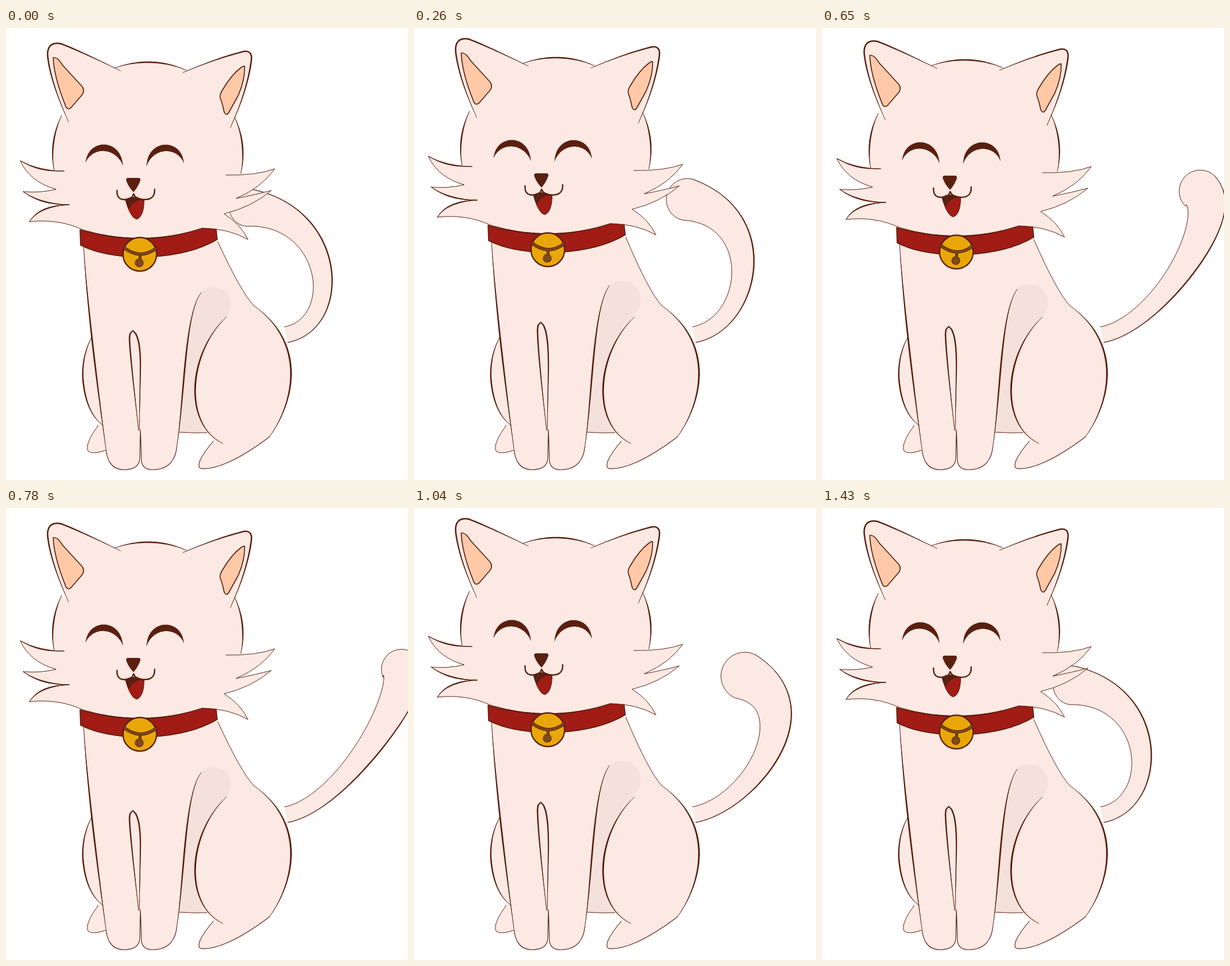
Write an HTML page that moves like this. It is 706 by 793 pixels and loops after 1560 ms.

```html
<!DOCTYPE html>
<html lang="en">
<head>
<meta charset="utf-8">
<title>Happy cat</title>
<style>
  html, body { margin: 0; width: 100%; height: 100%; overflow: hidden; background: #fff; }
  svg { display: block; width: 706px; height: 793px; }
  path, circle { stroke-linecap: round; stroke-linejoin: round; }
</style>
</head>
<body>
<svg viewBox="0 0 706 793">
  <g id="tail"></g>
  <g id="body"></g>
  <g id="head"></g>
</svg>
<script>
const STEP = 130, STEPS = 12;
const FUR = '#fce9e3', LINE = '#5a2010', RED = '#a01c15', GOLD = '#e9a707',
      BRONZE = '#804a1d', EAR = '#ffc9a8', SHADE = '#f4e1dc';

const fill = (d, color) => `<path d="${d}" fill="${color}"/>`;
const stroke = (d, w = 1, color = LINE) =>
  `<path d="${d}" fill="none" stroke="${color}" stroke-width="${w}"/>`;
const disc = (x, y, r, color, w) =>
  `<circle cx="${x}" cy="${y}" r="${r}" fill="${color}" stroke="${LINE}" stroke-width="${w}"/>`;
// Chains open paths into one closed outline
const glue = (...parts) => parts.join('').replace(/(?!^)M/g, 'L') + 'Z';
const line = points => 'M' + points.map(p => p.map(v => v.toFixed(2)).join(' ')).join('L');

// Both edges of a band that follows a path; radius depends on the way along it
const ruler = document.createElementNS('http://www.w3.org/2000/svg', 'path');
function band(d, radius, n = 48) {
  ruler.setAttribute('d', d);
  const length = ruler.getTotalLength(), at = t => ruler.getPointAtLength(t * length);
  const left = [], right = [];
  for (let i = 0; i <= n; i++) {
    const t = i / n, p = at(t), a = at(Math.max(0, t - .01)), b = at(Math.min(1, t + .01));
    const dx = b.x - a.x, dy = b.y - a.y, k = radius(t) / Math.hypot(dx, dy);
    left.push([p.x + dy * k, p.y - dx * k]);
    right.push([p.x - dy * k, p.y + dx * k]);
  }
  return { left, right };
}

// Pen line that swells towards its middle
function brush(d, w) {
  const { left, right } = band(d, t => w / 2 * Math.sin(Math.PI * t));
  return fill(line([...left, ...right.reverse()]) + 'Z', LINE) + stroke(d, .9);
}

// Key poses by amount of swing: bend of the spine, centre and radius of the tip
const poses = [
  { swing: 0,    bend: [579, 329], tip: [425, 315], r: [33] },
  { swing: .25,  bend: [623, 334], tip: [480, 301], r: [37] },
  { swing: .75,  bend: [703, 350], tip: [581, 295], r: [42] },
  { swing: .933, bend: [712, 326], tip: [664, 286], r: [37] }
];

function poseAt(swing) {
  const i = swing < .25 ? 0 : swing < .75 ? 1 : 2;
  const a = poses[i], b = poses[i + 1], k = (swing - a.swing) / (b.swing - a.swing);
  const mix = key => a[key].map((v, j) => v + (b[key][j] - v) * k);
  return { bend: mix('bend'), tip: mix('tip'), r: mix('r')[0] };
}

function drawTail(swing) {
  const { bend, tip, r } = poseAt(swing);
  const { left, right } = band(`M492 538C592 519 ${bend} ${tip}`, t => 14 + (r - 14) * t * t);
  const inner = left.reverse();
  const outline = line(right) + `A${r} ${r} 0 0 0 ${inner[0]}` + line(inner).replace('M', 'L');
  return fill(outline, FUR) + stroke(outline) + brush(line(right), 2.4);
}

function drawBody(lift) {
  const top = (y, k = 1) => y - lift * k;
  const legL = `M136 ${top(380)}Q144 ${top(510, .5)} 176 742`;
  const paws = 'M176 742Q180 774 206 775Q234 775 235 755L236 705L238 760Q240 775 258 775Q296 774 300 735';
  const legR = `M300 735C314 640 314 ${top(500)} 343 ${top(464, 1.5)}`;
  const gap = `M233 706Q218 575 217 ${top(548, 1.85)}Q216 ${top(532, 1.85)} 223 ${top(531, 1.85)}` +
              `Q237 ${top(540, 1.85)} 236 600L234 706`;
  const haunchL = 'M151 541Q133 575 135 615Q140 675 170 697';
  const footL = 'M162 697Q138 730 144 742Q150 749 175 741';
  const floor = 'M303 709Q328 711 353 710';
  const footR = 'M364 725Q330 765 342 773Q385 776 463 717';
  const rump = 'M463 717C510 650 525 550 435 487';
  const back = `M435 487Q412 462 372 ${top(375)}`;
  const thigh = 'M387 507C320 570 310 695 381 729';
  const shade = `M303 709C314 630 314 ${top(500)} 343 ${top(464, 1.5)}` +
                `A28 28 0 0 1 387 ${top(507, .6)}C320 570 317 660 353 710Z`;
  return fill(glue(haunchL, footL), FUR) + brush(haunchL, 2.6) + stroke(footL) +
    fill(glue(legL, paws, floor, footR, rump, back), FUR) + fill(shade, SHADE) +
    stroke(floor) + brush(legL, 2.8) + stroke(paws, 1.2) + brush(legR, 2.8) +
    brush(gap, 2.6) + brush(thigh, 3) + stroke(footR, 1.1) + brush(rump, 3) + stroke(back);
}

// Part of the round skull, between two angles in degrees
function skull(from, to) {
  const at = deg => {
    const a = deg * Math.PI / 180;
    return `${249 + 167 * Math.cos(a)} ${222 + 162 * Math.sin(a)}`;
  };
  return `M${at(from)}A167 162 0 0 1 ${at(to)}`;
}

function drawHead() {
  const cheekL = skull(170, 205), crown = skull(250, 294), cheekR = skull(336, 372);
  const earL = 'M110 165Q78 95 73 48Q72 24 95 27Q125 38 201 75';
  const earR = 'M311 78Q370 53 418 41Q433 39 431 56Q424 110 394 175';
  const furR = 'M386 258Q440 259 472 247Q449 280 404 299Q440 292 466 285' +
               'Q432 314 383 326Q412 344 425 371Q392 352 345 351';
  const chin = 'M345 351Q240 386 135 354';
  const furL = 'M135 354Q92 334 41 340Q58 312 111 310Q62 310 30 287Q58 290 88 283Q42 270 25 233Q58 252 102 251';
  const boldFur = ['M25 233Q58 252 102 251', 'M30 287Q62 310 111 310', 'M41 340Q58 312 111 310'];
  const innerEars = [
    'M83 52Q90 50 100 66L134 103Q139 111 133 118L114 140Q107 145 104 135Q84 85 83 52Z',
    'M419 67Q420 90 408 118L392 147Q387 156 383 147Q380 132 377 125Q374 118 380 109Q396 82 412 70Q417 66 419 67Z'
  ];
  const collar = 'M130 354Q240 386 345 351L369 352L371 371Q320 401 236 402Q170 401 131 381Z';
  const strap = 'M208 386Q236 407 263 387', stem = 'M235.5 397V407';

  return [
    fill(collar, RED), stroke(collar, 1.6),
    fill(glue(cheekL, earL, crown, earR, cheekR, furR, chin, furL), FUR),
    stroke(furL), stroke(furR), ...boldFur.map(d => brush(d, 2.4)),
    ...[cheekL, earL, crown, earR, cheekR, chin].map(d => brush(d, 2.6)),
    ...innerEars.map(d => fill(d, EAR) + stroke(d, 1.7)),
    // Eyes, mouth, tongue, nose
    brush('M140 235C150 201 195 201 205 240', 11.5),
    brush('M247 241C256 201 303 201 312 236', 11.5),
    fill('M209 301Q224 291 243 302Q243 330 230 336Q218 334 209 301Z', LINE),
    fill('M215 319Q222 304 236 301L242 303Q242 328 230 335Q222 333 215 319Z', RED),
    stroke('M195 285Q194 301 208 301Q222 301 224 291Q228 301 243 301Q262 301 261 283', 2.4),
    fill('M214 263H233Q238 264 235 270Q231 280 224 288Q216 280 212 270Q209 264 214 263Z', LINE),
    // Bell
    disc(235, 397, 29.5, GOLD, 2.4),
    stroke(strap, 5.5), stroke(stem, 5), disc(234, 412, 7, BRONZE, 1.2),
    stroke(strap, 3, BRONZE), stroke(stem, 2.6, BRONZE)
  ].join('');
}

const [tail, body, head] = ['tail', 'body', 'head'].map(id => document.getElementById(id));
head.innerHTML = drawHead();

let shown = -1;
function render(ms) {
  const step = Math.floor(ms / STEP) % STEPS;
  if (step === shown) return;
  shown = step;
  const swing = (1 - Math.cos(2 * Math.PI * step / STEPS)) / 2;
  // The head bobs twice per swing
  const bob = step % 6, lift = Math.min(8, 4 * Math.min(bob, 6 - bob));
  tail.innerHTML = drawTail(swing);
  body.innerHTML = drawBody(lift);
  head.setAttribute('transform', `translate(${lift === 4 ? 1 : 0} ${-lift})`);
}

let begin;
function tick(now) {
  begin ??= now;
  render(now - begin);
  requestAnimationFrame(tick);
}
render(0);
requestAnimationFrame(tick);
</script>
</body>
</html>
```
